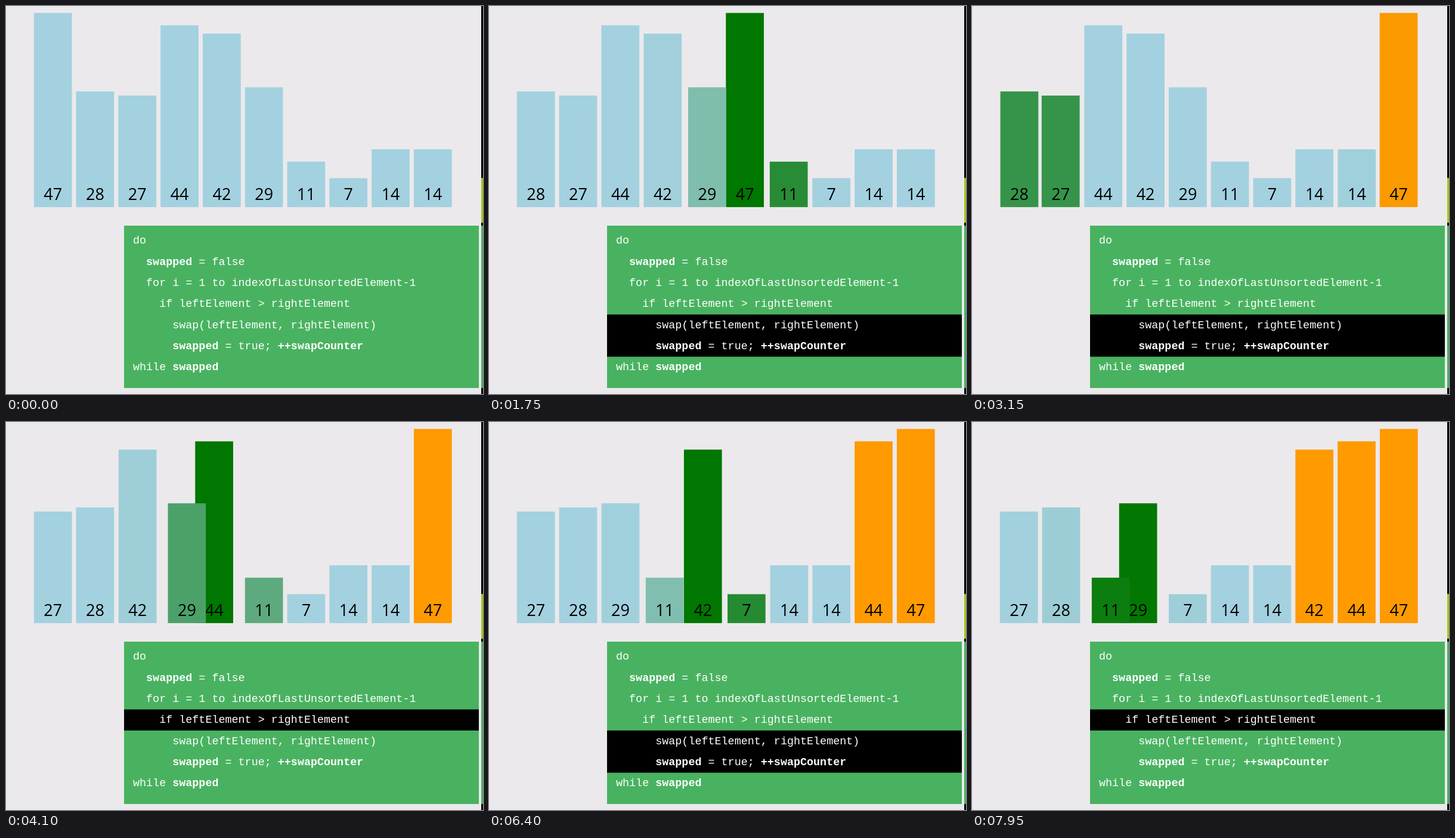
An HTML page with a canvas that plays this animation: 800 by 650 pixels, repeating every 8000 ms.

```html
<!DOCTYPE html>
<html lang="en">
<head>
<meta charset="utf-8">
<title>Bubble sort</title>
<style>
  html, body { margin: 0; width: 100%; height: 100%; overflow: hidden; background: #ebe9eb; }
  canvas { display: block; }
</style>
</head>
<body>
<canvas id="stage" width="800" height="650"></canvas>
<script>
const ctx = document.getElementById('stage').getContext('2d');

const LOOP = 8000, TICK = 50, TWEEN = 230;
const BLUE = [163, 209, 223], GREEN = [0, 119, 0], ORANGE = [255, 154, 0];
const PANEL = '#49b260';
const values = [47, 28, 27, 44, 42, 29, 11, 7, 14, 14];

// Slightly uneven tempo: [step number, start in ms]
const tempo = [
  [1, 38], [13, 1718], [22, 2988], [23, 3118], [28, 3858], [29, 3990],
  [36, 4969], [37, 5095], [46, 6368], [56, 7757], [57, 7905]
];

// Pseudocode rows; text between asterisks is bold
const code = [
  'do',
  '  *swapped* = false',
  '  for i = 1 to indexOfLastUnsortedElement-1',
  '    if leftElement > rightElement',
  '      swap(leftElement, rightElement)',
  '      *swapped* = true; *++swapCounter*',
  'while *swapped*'
];
const rowTop = [368, 411, 446, 481.5, 516.8, 552, 587.5, 630];

function stepStart(n) {
  let i = 1;
  while (i < tempo.length - 1 && tempo[i][0] < n) i++;
  const [n0, t0] = tempo[i - 1], [n1, t1] = tempo[i];
  return t0 + (t1 - t0) * (n - n0) / (n1 - n0);
}

// Each step holds the slot and colour every bar heads for, and the marked rows
function sortSteps() {
  const order = values.map((_, i) => i);
  const steps = [];
  let end = order.length;

  function push(rows, pair = -1) {
    const goals = [];
    order.forEach((bar, slot) => {
      const active = pair >= 0 && (slot === pair || slot === pair + 1);
      goals[bar] = { slot, color: active ? GREEN : slot >= end ? ORANGE : BLUE };
    });
    steps.push({ rows, goals, start: stepStart(steps.length + 1) });
  }

  let swapped;
  do {
    swapped = false;
    push([1, 2]);
    for (let i = 0; i < end - 1; i++) {
      push([3], i);
      if (values[order[i]] > values[order[i + 1]]) {
        [order[i], order[i + 1]] = [order[i + 1], order[i]];
        swapped = true;
        push([4, 5], i);
      }
    }
    end--;
    push([6]);
  } while (swapped);
  return steps;
}

const steps = sortSteps();
const ease = u => u < 0.5 ? 4 * u ** 3 : 1 - 4 * (1 - u) ** 3;
const mix = (a, b, p) => a + (b - a) * p;

// A new step takes over the unfinished tween of the one before
function poseAt(t) {
  const bars = values.map((_, i) => ({ slot: i, color: BLUE }));
  let rows = [];
  for (let n = 0; n < steps.length && steps[n].start <= t; n++) {
    const step = steps[n];
    const stop = n + 1 < steps.length ? Math.min(t, steps[n + 1].start) : t;
    const p = ease(Math.min(1, (stop - step.start) / TWEEN));
    rows = step.rows;
    bars.forEach((bar, i) => {
      const goal = step.goals[i];
      bar.slot = mix(bar.slot, goal.slot, p);
      bar.color = bar.color.map((c, k) => mix(c, goal.color[k], p));
    });
  }
  return { bars, rows };
}

function box(color, x, y, w, h) {
  ctx.fillStyle = color;
  ctx.fillRect(x, y, w, h);
}

function drawBars(bars) {
  ctx.font = '27px "Open Sans", "Noto Sans", sans-serif';
  ctx.textAlign = 'center';
  bars.forEach((bar, i) => {
    const x = 46.8 + 70.8 * bar.slot, h = values[i] * 6.92;
    box(`rgb(${bar.color.map(Math.round)})`, x, 336.9 - h, 63.7, h);
    ctx.fillStyle = '#000';
    ctx.fillText(values[i], x + 31.9, 325);
  });
}

function drawCode(rows) {
  box(PANEL, 198, 368, 595, 272);
  rows.forEach(r => box('#000', 198, rowTop[r], 595, rowTop[r + 1] - rowTop[r]));
  ctx.fillStyle = '#fff';
  ctx.textAlign = 'left';
  code.forEach((line, r) => {
    let x = 213;
    line.split('*').forEach((part, k) => {
      ctx.font = `${k % 2 ? 'bold ' : ''}18.4px "Liberation Mono", "Courier New", monospace`;
      ctx.fillText(part, x, 398.3 + 35.35 * r);
      x += ctx.measureText(part).width;
    });
  });
}

function drawEdge() {
  box('#000', 797, 0, 3, 650);
  box('#a5c814', 797, 288, 3, 75);
  box(PANEL, 797, 368, 3, 272);
}

const began = performance.now();
function frame() {
  const t = Math.floor((performance.now() - began) % LOOP / TICK) * TICK;
  const { bars, rows } = poseAt(t);
  box('#ebe9eb', 0, 0, 800, 650);
  drawBars(bars);
  drawCode(rows);
  drawEdge();
  requestAnimationFrame(frame);
}
frame();
</script>
</body>
</html>
```
